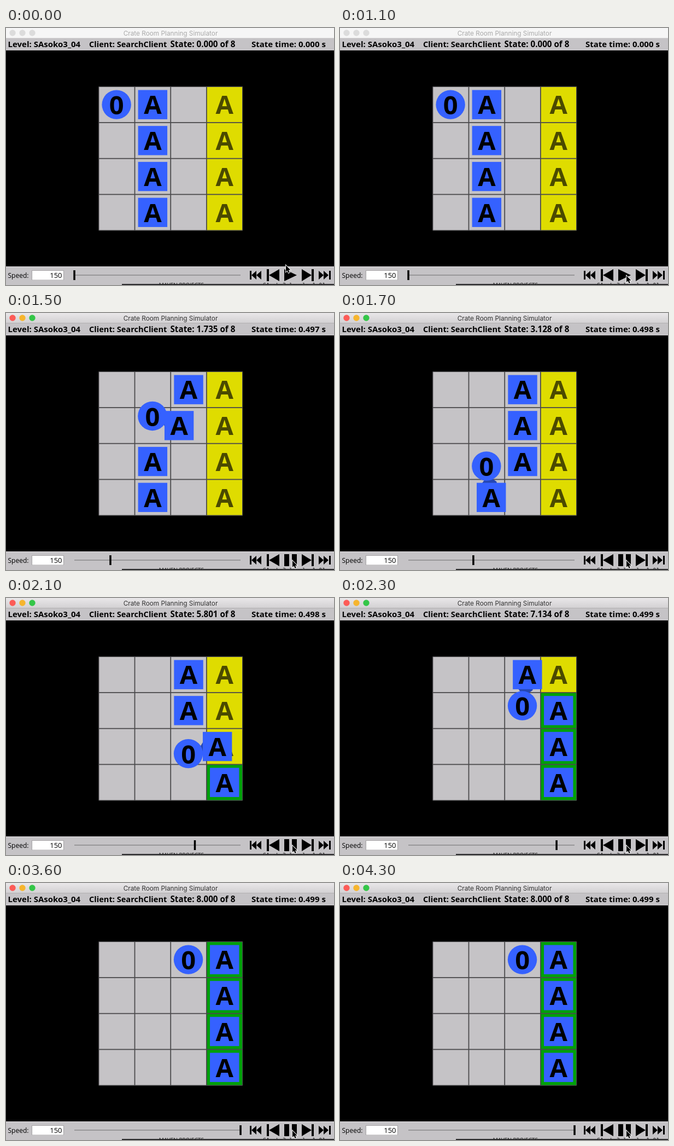
These frames come from a looping animation (600 px wide and 470 px high, 4.4 s). An HTML page with a canvas:

```html
<!DOCTYPE html>
<html lang="en">
<head>
<meta charset="utf-8">
<title>Crate Room Planning Simulator</title>
<style>
  html, body { margin: 0; width: 100%; height: 100%; overflow: hidden; background: #000; }
  canvas { display: block; }
</style>
</head>
<body>
<canvas id="stage" width="600" height="470"></canvas>
<script>
const ctx = document.getElementById('stage').getContext('2d');
const LOOP = 4400, STEP = 100;
const CELL = 65.7, LEFT = 169.8, TOP = 107.3;
const GRAY = '#c5c3c6', BLUE = '#3561ff', ARM = '#2547b4', YELLOW = '#dfdc00', GREEN = '#00a00a';
const SANS = '"Open Sans", "Noto Sans", sans-serif';

// Playback clock: [time in ms, plan state]
const CLOCK = [[1240, 0], [1500, 1.735], [1700, 3.128], [2100, 5.801], [2430, 8]];

// Each push: the agent's direction; the box always goes east.
const RIGHT = [1, 0], DOWN = [0, 1], UP = [0, -1];
const PLAN = [
  [RIGHT, 0], [DOWN, 1], [DOWN, 2], [DOWN, 3],
  [RIGHT, 3], [UP, 2], [UP, 1], [UP, 0]
];

const centerX = col => LEFT + (col + 0.5) * CELL;
const centerY = row => TOP + (row + 0.5) * CELL;

function rect(x, y, w, h, color) {
  ctx.fillStyle = color;
  ctx.fillRect(x, y, w, h);
}

function polygon(points, color) {
  ctx.fillStyle = color;
  ctx.beginPath();
  points.forEach(([x, y]) => ctx.lineTo(x, y));
  ctx.closePath();
  ctx.fill();
}

function disc(x, y, r, color) {
  ctx.fillStyle = color;
  ctx.beginPath();
  ctx.arc(x, y, r, 0, Math.PI * 2);
  ctx.fill();
}

function text(str, x, y, font, color = '#000', align = 'left') {
  ctx.font = font;
  ctx.fillStyle = color;
  ctx.textAlign = align;
  ctx.fillText(str, x, y);
}

function stateAt(t) {
  if (t <= CLOCK[0][0]) return 0;
  for (let i = 1; i < CLOCK.length; i++) {
    const [t0, s0] = CLOCK[i - 1], [t1, s1] = CLOCK[i];
    if (t < t1) return s0 + (s1 - s0) * (t - t0) / (t1 - t0);
  }
  return 8;
}

function sceneAt(state) {
  const scene = { agent: [0, 0], boxes: [1, 1, 1, 1], pushed: -1 };
  PLAN.forEach(([dir, box], i) => {
    const part = Math.min(1, Math.max(0, state - i));
    scene.agent[0] += dir[0] * part;
    scene.agent[1] += dir[1] * part;
    scene.boxes[box] += part;
    if (part > 0 && part < 1) scene.pushed = box;
  });
  return scene;
}

function drawTitleBar(active) {
  const shade = ctx.createLinearGradient(0, 0, 0, 18);
  shade.addColorStop(0, active ? '#e9e7e9' : '#f6f6f6');
  shade.addColorStop(1, active ? '#d3d1d3' : '#f6f6f6');
  rect(0, 0, 600, 18, shade);
  rect(0, 18, 600, 1, active ? '#b2b0b2' : '#d4d3d4');
  const lights = active ? ['#fc5b57', '#f6b52e', '#34c648'] : ['#dcdcdc', '#dcdcdc', '#dcdcdc'];
  lights.forEach((color, i) => disc(12 + 18 * i, 9, 5.7, color));
  text('Crate Room Planning Simulator', 301, 13.5, '11.8px Inter, Roboto, sans-serif',
    active ? '#333' : '#aaa', 'center');
}

function drawStatus(state) {
  const bold = size => `bold ${size}px ${SANS}`;
  const stateTime = ['0.000', '0.497', '0.497', '0.498', '0.498', '0.498', '0.498', '0.499', '0.499'][Math.floor(state)];
  rect(0, 19, 600, 22, GRAY);
  text('Level: SAsoko3_04', 3.5, 35, bold(15));
  text('Client: SearchClient', 152, 35, bold(14.6));
  text(`State: ${state.toFixed(3)} of 8`, 300.5, 35, bold(15.2));
  text(`State time: ${stateTime} s`, 449, 35, bold(15));
}

function letter(str, x, y, color) {
  text(str, x, y + 17.3, `bold 47px ${SANS}`, color, 'center');
}

function drawArm(ax, ay, bx, by) {
  ctx.save();
  ctx.translate(ax, ay);
  ctx.rotate(Math.atan2(by - ay, bx - ax));
  polygon([[17, 0], [31, -14], [42, -14], [42, 14], [31, 14]], ARM);
  ctx.restore();
}

function drawBoard(state) {
  const { agent, boxes, pushed } = sceneAt(state);
  rect(0, 41, 600, 395, '#000');
  rect(LEFT, TOP, 4 * CELL, 4 * CELL, GRAY);
  boxes.forEach((col, row) => {
    const solved = col > 2.999;
    rect(LEFT + 3 * CELL, TOP + row * CELL, CELL, CELL, solved ? GREEN : YELLOW);
    if (!solved) letter('A', centerX(3), centerY(row), '#4b4a00');
  });
  for (let i = 0; i <= 4; i++) {
    const width = i % 4 ? 1.8 : 1.2;
    rect(LEFT + i * CELL - width / 2, TOP, width, 4 * CELL, '#4b4a4c');
    rect(LEFT, TOP + i * CELL - width / 2, 4 * CELL, width, '#4b4a4c');
  }

  const ax = centerX(agent[0]) - 0.5, ay = centerY(agent[1]);
  if (pushed >= 0) drawArm(ax, ay, centerX(boxes[pushed]), centerY(pushed));
  disc(ax, ay, 26.7, BLUE);
  letter('0', ax, ay + 1, '#000');
  boxes.forEach((col, row) => {
    const x = centerX(col), y = centerY(row);
    rect(x - 26.7, y - 26.7, 53.4, 53.4, BLUE);
    letter('A', x, y, '#000');
  });
}

// Horizontal triangle from its flat side to its tip, centred on the button row.
function triangle(base, tip, half) {
  polygon([[base, 452 - half], [tip, 452], [base, 452 + half]], '#000');
}

function drawButtons(playing) {
  const bar = (x, w, half) => rect(x, 452 - half, w, 2 * half, '#000');
  bar(446, 3, 8); triangle(458, 449, 8); triangle(467, 458, 8);
  bar(477, 4, 11); triangle(500, 481, 11);
  if (playing) { bar(509, 9, 11); bar(523, 9, 11); } else triangle(509, 532, 11);
  triangle(541, 559, 11); bar(559, 4, 11);
  triangle(572, 581, 8); triangle(581, 590, 8); bar(591, 3, 8);
}

function drawControls(state, playing) {
  rect(0, 436, 600, 34, GRAY);
  rect(0, 436, 600, 1, '#dddbdd');
  rect(212, 468, 388, 2, '#2a2a2c');
  ctx.save();
  ctx.beginPath();
  ctx.rect(0, 466, 600, 4);
  ctx.clip();
  text('- MAVEN PROJECTS', 274, 474, `10px ${SANS}`, '#222');
  text('SAsoko3 levels 1.01', 470, 474, '10px "DejaVu Sans Mono", monospace', '#222');
  ctx.restore();

  text('Speed:', 3.5, 456.5, `12px ${SANS}`);
  rect(47, 443, 59, 18, '#a5a3a5');
  rect(48, 444, 57, 16.5, '#fff');
  text('150', 102.5, 456.7, `13px ${SANS}`, '#000', 'right');
  rect(125, 451.2, 304, 1.5, '#8b898b');
  rect(123.3 + state * 38, 443, 3.5, 18, '#000');
  drawButtons(playing);
}

function drawCursor(t) {
  const part = Math.min(1, t / 600);
  const ease = 1 - (1 - part) ** 2;
  ctx.save();
  ctx.translate(512 + 12 * ease, 434 + 19 * ease);
  ctx.beginPath();
  [[0, 0], [0, 12], [2.7, 9.5], [4.7, 14], [6.8, 13], [4.9, 8.8], [8.5, 8.5]]
    .forEach(([x, y]) => ctx.lineTo(x, y));
  ctx.closePath();
  ctx.strokeStyle = '#fff';
  ctx.lineWidth = 1.8;
  ctx.stroke();
  ctx.fillStyle = '#000';
  ctx.fill();
  ctx.restore();
}

function frame(now) {
  const t = Math.floor((now % LOOP) / STEP) * STEP;
  const state = stateAt(t);
  drawTitleBar(t >= 1200);
  drawStatus(state);
  drawBoard(state);
  drawControls(state, t >= 1300);
  drawCursor(t);
  requestAnimationFrame(frame);
}
requestAnimationFrame(frame);
</script>
</body>
</html>
```
